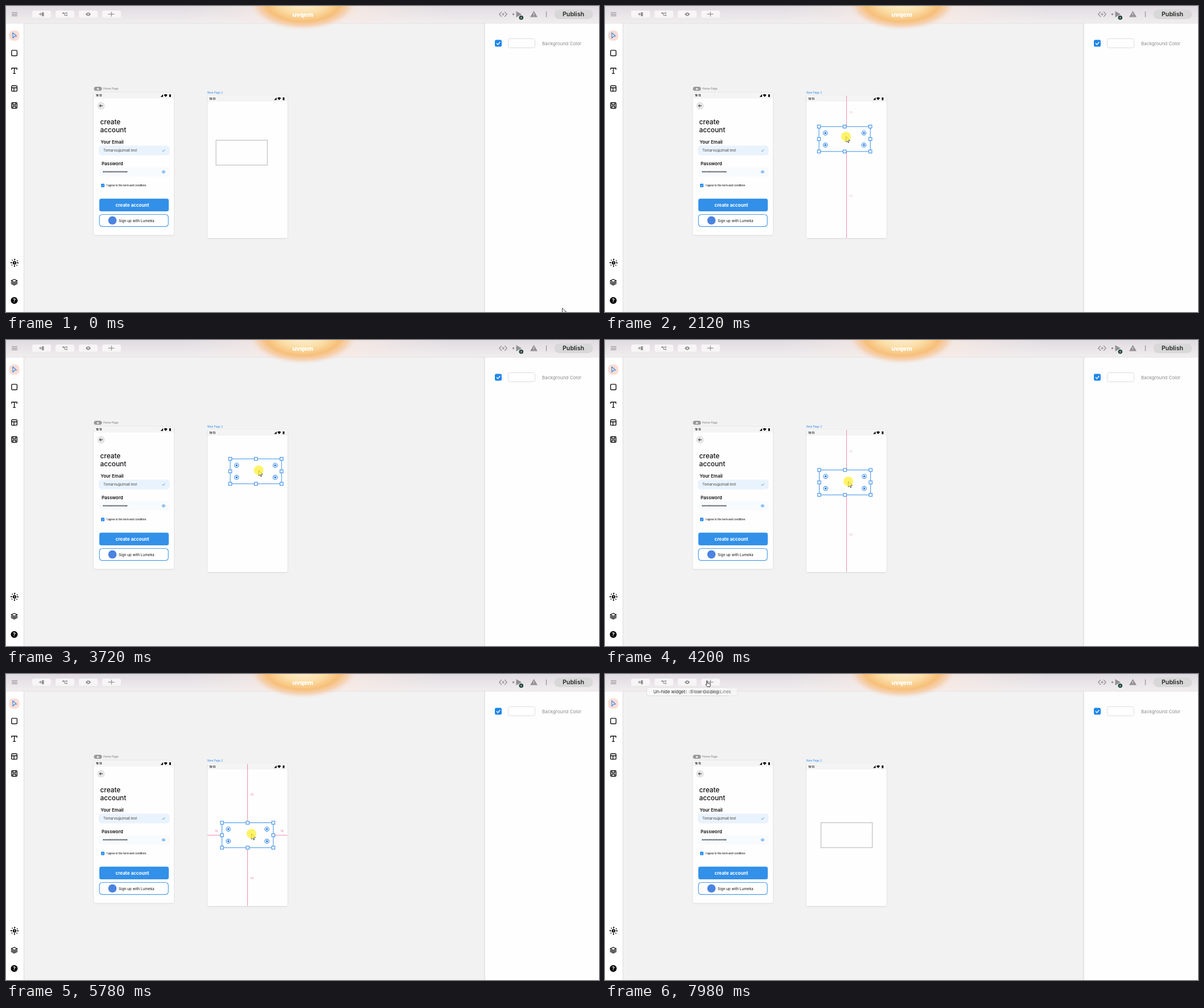
An HTML page that plays this animation: 1042x538 px, repeating every 8 s.

```html
<!DOCTYPE html>
<html lang="en">
<head>
<meta charset="utf-8">
<title>Page editor: dragging a widget</title>
<style>
html, body { margin: 0; width: 100%; height: 100%; overflow: hidden; background: #f2f2f2; }
svg { display: block; width: 100%; height: 100%; }
text { font-family: Inter, "Open Sans", sans-serif; }
.ink { fill: none; stroke: #111; stroke-width: 1.4; stroke-linecap: round; stroke-linejoin: round; }
.dim { fill: none; stroke: #929093; stroke-width: 1.2; stroke-linecap: round; stroke-linejoin: round; }
.blue { fill: none; stroke: #3b8fe8; }
.num { font-size: 5.2px; fill: #f07f9e; text-anchor: middle; }
</style>
</head>
<body>
<svg viewBox="0 0 1042 538">
  <defs>
    <linearGradient id="bar" x2="0" y2="1">
      <stop offset="0" stop-color="#dfdbe0"/><stop offset="1" stop-color="#f1eeef"/>
    </linearGradient>
    <radialGradient id="glow">
      <stop offset="0" stop-color="#fdf0d4"/>
      <stop offset=".4" stop-color="#fbdfa9"/>
      <stop offset=".68" stop-color="#f7bf79"/>
      <stop offset=".84" stop-color="#f6cba5" stop-opacity=".75"/>
      <stop offset="1" stop-color="#f4e4de" stop-opacity="0"/>
    </radialGradient>
    <radialGradient id="blush">
      <stop offset="0" stop-color="#fbeae0"/><stop offset="1" stop-color="#f6ebea" stop-opacity="0"/>
    </radialGradient>
    <filter id="soft" x="-10%" y="-10%" width="120%" height="120%">
      <feDropShadow dx="0" dy=".5" stdDeviation="1.2" flood-opacity=".16"/>
    </filter>
    <g id="status">
      <path d="M0 10.5V3a3 3 0 0 1 3-3H137.500a3 3 0 0 1 3 3V10.500z" fill="#f4f4f4"/>
      <text x="3.500" y="7.100" font-size="4.200" font-weight="700">19:13</text>
      <path d="M117 7.800h4.500V3.300zM122.900 4.500a4.600 4.600 0 0 1 6.200 0l-3.100 3.600z"/>
      <rect x="132.400" y="3.300" width="2.800" height="4.600" rx=".5"/>
    </g>
  </defs>

  <rect width="1042" height="538" fill="#f2f2f2"/>
  <rect y="30" width="31.500" height="508" fill="#fff"/>
  <path d="M31.500 30V538" stroke="#dcdcdc"/>
  <rect x="841" y="30" width="201" height="508" fill="#fefefe"/>
  <path d="M841 30V538" stroke="#d2d2d2"/>

  <!-- top bar -->
  <rect width="1042" height="30" fill="url(#bar)"/>
  <path d="M0 30.200H1042" stroke="#dedcdd" stroke-width=".8"/>
  <svg width="1042" height="30"><ellipse cx="545" cy="8" rx="235" ry="70" fill="url(#blush)"/></svg>
  <ellipse cx="522" cy="-6" rx="96" ry="49" fill="url(#glow)"/>
  <text x="521.500" y="18.600" font-size="10.800" font-weight="800" fill="#fff" text-anchor="middle">uvqem</text>
  <path class="dim" d="M10.500 11.500h9M10.500 14.300h9M10.500 17.100h9"/>
  <g id="tools" fill="#f7f5f6"></g>
  <g class="dim">
    <path d="M58.500 14.300h4M60.500 12.300v4"/>
    <rect x="63.500" y="11.500" width="2.500" height="6" fill="#929093"/>
    <path d="M100.500 12.500h6M103 12.500v4h3.500"/>
    <path d="M140.500 14.500q4-5.200 8 0q-4 5.200-8 0z" fill="#929093"/>
    <path d="M180 14.300h10M185.300 10.500v7.600"/>
  </g>
  <g fill="#929093">
    <circle cx="100.500" cy="12.500" r="1.500"/><circle cx="106.700" cy="12.500" r="1.300"/><circle cx="106.700" cy="16.500" r="1.300"/>
    <circle cx="144.500" cy="14.500" r="1.300" fill="#f7f5f6"/>
    <circle cx="891.500" cy="14.500" r="1.700"/>
    <path d="M896.500 9v11l9.500-5.500zM927.500 8.800l6.500 10.700h-13z"/>
  </g>
  <path class="dim" d="M870.500 10.500l-3.700 4 3.700 4M876.500 10.500l3.700 4-3.700 4M871.500 14.500h4M873.500 12.500v4M949.500 10v9"/>
  <path d="M927.500 12.500v3.500M927.500 17.300v.8" stroke="#eee" stroke-width="1"/>
  <circle cx="905.300" cy="20.500" r="3.800" fill="#23443a"/>
  <path d="M905.300 18.700v3M904 20.700l1.300 1.300 1.300-1.300" stroke="#fff" stroke-width=".7" fill="none"/>
  <rect x="963.500" y="6" width="68" height="17" rx="8.500" fill="#d9d8d9"/>
  <text x="997" y="18.300" font-size="10.700" font-weight="600" fill="#252525" text-anchor="middle">Publish</text>

  <!-- side bar -->
  <rect x="5.500" y="43" width="18" height="18" rx="7" fill="#fcdcd4"/>
  <path d="M11.800 47l6.700 6-3.500.500-2.900 3z" class="blue" stroke-width="1.200" stroke-linejoin="round"/>
  <g class="ink">
    <rect x="9.800" y="77.900" width="9.600" height="9.600" rx="1.500"/>
    <path d="M10 111.500v-2.300h9.200v2.300M14.600 109.200v9.400M12.700 118.600h3.800"/>
    <rect x="9.800" y="140.300" width="9.600" height="9.600" rx="1.500"/>
    <path d="M9.800 143.700h9.600M14 143.700v6.200"/>
    <rect x="9.800" y="170" width="9.600" height="9.800" rx="1.500"/>
    <path d="M12 170.500v3h5.200v-3M12 179.500v-3.500h5.200v3.500"/>
    <path d="M14.500 480.500l5.300 2.700-5.300 2.700-5.300-2.700zM9.200 485.700l5.300 2.700 5.300-2.700M9.200 488l5.300 2.700 5.300-2.700"/>
    <circle cx="15" cy="451.500" r="6" stroke-dasharray=".1 4.600" stroke-width="1.800"/>
    <path d="M15 445v2M15 456v2M8.500 451.500h2M19.500 451.500h2"/>
  </g>
  <circle cx="15" cy="451.500" r="3.100"/>
  <path d="M15.800 448.800l-2 3.100h1.400l-.7 2.400 2-3.200h-1.300z" fill="#fff"/>
  <circle cx="14.500" cy="517.800" r="6"/>
  <text x="14.500" y="521.200" font-size="9" font-weight="700" fill="#fff" text-anchor="middle">?</text>

  <!-- property panel -->
  <rect x="859" y="59.500" width="12" height="12" rx="2.500" fill="#1e86ec"/>
  <path d="M862 65.500l2.300 2.400 4-4.600" fill="none" stroke="#fff" stroke-width="1.400"/>
  <rect x="882.500" y="57.500" width="47" height="16" rx="3" fill="#fff" stroke="#dcdcdc"/>
  <text x="942" y="68.500" font-size="8.150" fill="#8a8a8a">Background Color</text>

  <!-- home page -->
  <rect x="154.500" y="142" width="14" height="7" rx="3.500" fill="#999"/>
  <path d="M159.700 145.500l1.800-1.800 1.800 1.800v1.700h-3.600z" fill="#eee"/>
  <text x="171" y="147.300" font-size="4.850" fill="#777">Home Page</text>
  <rect x="154.500" y="152" width="140.500" height="250.500" rx="3" fill="#fefefe" filter="url(#soft)"/>
  <use href="#status" x="154.500" y="152"/>
  <circle cx="167" cy="175.400" r="6.700" fill="#e6e6e6"/>
  <path d="M169.800 175.400h-5.400M166.700 173l-2.400 2.400 2.400 2.400" fill="none" stroke="#222"/>
  <g font-size="11.800" font-weight="500" fill="#111">
    <text x="165.500" y="208">create</text><text x="165.500" y="222.300">account</text>
  </g>
  <g font-size="7.950" font-weight="600" fill="#111">
    <text x="166.300" y="241.700">Your Email</text><text x="168" y="280.400">Password</text>
  </g>
  <rect x="163" y="245.500" width="124.500" height="17" rx="5" fill="#e9f3fd"/>
  <text x="171" y="256.400" font-size="6.150" fill="#444">Tomarvu@zmail.test</text>
  <path d="M274.700 254.200l1.600 1.600 3-3.400" class="blue"/>
  <rect x="163" y="283.200" width="124.500" height="17" rx="5" fill="#f8fbfe"/>
  <text x="170" y="295.400" font-size="7" font-weight="700" fill="#333" style="font-family:'Liberation Sans',sans-serif">****************</text>
  <path d="M273.700 291.600q3.200-4.200 6.400 0q-3.200 4.200-6.400 0z" class="blue" stroke-width=".9"/>
  <circle cx="276.900" cy="291.600" r="1.100" fill="#3b8fe8"/>
  <rect x="167" y="312.500" width="6" height="6" rx=".8" fill="#1e86ec"/>
  <path d="M168.400 315.500l1.200 1.300 2-2.400" fill="none" stroke="#fff" stroke-width=".8"/>
  <text x="176.800" y="317" font-size="4.480" font-weight="500" fill="#111">I agree to the term and condition.</text>
  <rect x="164" y="338.800" width="122" height="22.200" fill="#c5def6"/>
  <rect x="164" y="338.800" width="122" height="22.200" rx="4" fill="#3290e9"/>
  <text x="222" y="352.700" font-size="8.050" font-weight="700" fill="#fff" text-anchor="middle">create account</text>
  <rect x="164.200" y="366.500" width="121" height="21.200" rx="5" fill="#fff" stroke="#4f9dec" stroke-width="1.200"/>
  <circle cx="187" cy="377" r="7.300" fill="#4a83e0"/>
  <text x="198" y="379.500" font-size="6.300" font-weight="500" fill="#333">Sign up with Lumeka</text>

  <!-- second page -->
  <text x="354" y="154.300" font-size="4.750" fill="#2388ee">New Page 2</text>
  <rect x="354" y="157.500" width="140.500" height="250.500" rx="3" fill="#fefefe" filter="url(#soft)"/>
  <use href="#status" x="354" y="157.500"/>

  <g id="vGuide">
    <path stroke="#f08aa8" stroke-width="1"/>
    <text class="num" x="432"></text><text class="num" x="432"></text>
  </g>
  <g id="hGuide">
    <path stroke="#f08aa8" stroke-width="1"/>
    <text class="num" x="369.500">18</text><text class="num" x="485">18</text>
  </g>
  <g id="widget">
    <rect id="frame" width="90.200" height="43.800" fill="#fefefe"/>
    <g id="handles" class="blue" stroke-width="1.100"></g>
  </g>

  <g id="tipHide">
    <rect x="74" y="24.500" width="141" height="13" rx="4" fill="#fafafa" filter="url(#soft)"/>
    <text x="85" y="34" font-size="7.650" fill="#222">Un-hide widgets of current page.</text>
  </g>
  <g id="tipLines">
    <rect x="141" y="24.500" width="91" height="13" rx="4" fill="#fafafa" filter="url(#soft)"/>
    <text x="150" y="34" font-size="7.650" fill="#222">Show Guiding Lines</text>
  </g>

  <g id="pointer">
    <path id="arrow" d="M0 0v9.600l2.300-2.100 1.500 3.500 1.500-.700-1.500-3.300h3.200z" fill="#fff" stroke="#333" stroke-width=".9"/>
    <path id="hand" d="M0 0q1.200-1 1.700.4v4l4 .8q1.200.4 1 1.800l-.7 3.300H1.300L-1.700 6.600q.3-1.200 1.700 0z" fill="#fff" stroke="#222" stroke-width=".9"/>
    <circle id="press" r="8.600" fill="#ffee30" fill-opacity=".72"/>
  </g>
</svg>
<script>
const LOOP = 8000, STEP = 70;
const PRESS = 1080, RELEASE = 6720, DESELECT = 7140;
const PAGE = { left: 354, right: 494.5, top: 158, bottom: 408 };
const W = 90.2, H = 43.8, MID_X = 379.5, MID_Y = 261.5, UNIT = 1.38;

// rows: time, x, y
const drag = [
  [1080, 369, 236], [1350, 374, 231], [1610, 379.5, 222], [1840, 379.5, 213],
  [2100, 376, 212], [2450, 357, 214], [2590, 357, 214], [3010, 376, 212],
  [3430, 392, 210], [3710, 394, 209], [3920, 385, 213], [4130, 375, 224],
  [4270, 378, 233], [4340, 379.5, 238], [4620, 379.5, 252.2], [5040, 379.5, 261.5],
  [5110, 379.5, 261.5], [5390, 379.5, 270], [5740, 379.5, 261.5]
];
const grip = [[1080, 49, 19.5], [2100, 47.5, 17.5], [3710, 50, 20], [4620, 52, 20.3], [5740, 51.8, 19.3]];
const approach = [
  [0, 977.5, 531], [70, 969.5, 529], [210, 969.5, 529], [420, 880, 484],
  [700, 600, 336], [910, 450, 266], [1010, 431, 258], [1080, 418, 255.5]
];
const leave = [
  [6720, 431.3, 280.8], [6930, 425, 270], [7140, 325, 190], [7420, 215, 90],
  [7700, 146, 22], [7770, 146, 15], [7840, 152, 13], [7910, 166, 12], [7980, 178.5, 12]
];

const $ = id => document.getElementById(id);
const show = (id, on) => $(id).style.display = on ? "" : "none";
const clamp = v => Math.max(0, Math.min(1, v));

function at(track, t) {
  const i = track.findIndex(row => row[0] > t);
  if (i === 0) return track[0].slice(1);
  if (i < 0) return track[track.length - 1].slice(1);
  const a = track[i - 1], b = track[i], k = (t - a[0]) / (b[0] - a[0]);
  return [1, 2].map(n => a[n] + (b[n] - a[n]) * k);
}

function build() {
  $("tools").innerHTML = [46, 87, 128, 169]
    .map(x => `<rect x="${x}" y="8" width="33" height="12.800" rx="3"/>`).join("");
  let parts = "";
  for (const i of [0, .5, 1]) for (const j of [0, .5, 1]) {
    if (i === .5 && j === .5) continue;
    parts += `<rect x="${i * W - 2.7}" y="${j * H - 2.7}" width="5.400" height="5.400" fill="#fff"/>`;
    if (i === .5 || j === .5) continue;
    const c = `cx="${i * W + 11.2 * (1 - 2 * i)}" cy="${j * H + 11.2 * (1 - 2 * j)}"`;
    parts += `<circle ${c} r="3.700" fill="#fff"/><circle ${c} r="1.800" fill="#2479e0" stroke="none"/>`;
  }
  $("handles").innerHTML = parts;
}

function drawGuides(x, y, held) {
  const off = Math.abs(x - MID_X), vert = held && off < 4.2;
  const horiz = vert && Math.abs(y - MID_Y) < 1;
  show("vGuide", vert);
  show("hGuide", horiz);
  if (vert) {
    const [line, above, below] = $("vGuide").children;
    line.setAttribute("d", `M424.400 ${PAGE.top}V${y}M424.400 ${y + H}V${PAGE.bottom}`);
    const gaps = [[above, PAGE.top, y], [below, y + H, PAGE.bottom]];
    for (const [label, from, to] of gaps) {
      label.textContent = Math.round((to - from) / UNIT);
      label.setAttribute("y", (from + to) / 2 + 4.3);
      label.setAttribute("opacity", 1 - off / 7);
    }
  }
  if (horiz) {
    const [line, ...labels] = $("hGuide").children, cy = y + H / 2;
    line.setAttribute("d", `M${PAGE.left} ${cy}H${x}M${x + W} ${cy}H${PAGE.right}`);
    labels.forEach(label => label.setAttribute("y", cy - 5.2));
  }
}

function draw(now) {
  const t = Math.floor((now % LOOP) / STEP) * STEP;
  const held = t >= PRESS && t < RELEASE, chosen = t >= PRESS && t < DESELECT;
  const [x, y] = at(drag, t);

  $("widget").setAttribute("transform", `translate(${x} ${y})`);
  $("frame").setAttribute("stroke", chosen ? "#3b8fe8" : "#b4b4b4");
  show("handles", chosen);
  drawGuides(x, y, held);

  let [px, py] = at(t < PRESS ? approach : leave, t);
  if (held) {
    const [dx, dy] = at(grip, t);
    px = x + dx;
    py = y + dy;
  }
  const hover = t >= 7770;
  $("pointer").setAttribute("transform", `translate(${px} ${py})`);
  show("press", held);
  show("arrow", !hover);
  show("hand", hover);
  $("tipHide").setAttribute("opacity", clamp((t - 7700) / 140));
  $("tipLines").setAttribute("opacity", .6 * clamp((t - 7840) / 140));
}

function tick() {
  draw(performance.now());
  requestAnimationFrame(tick);
}
build();
tick();
</script>
</body>
</html>
```
